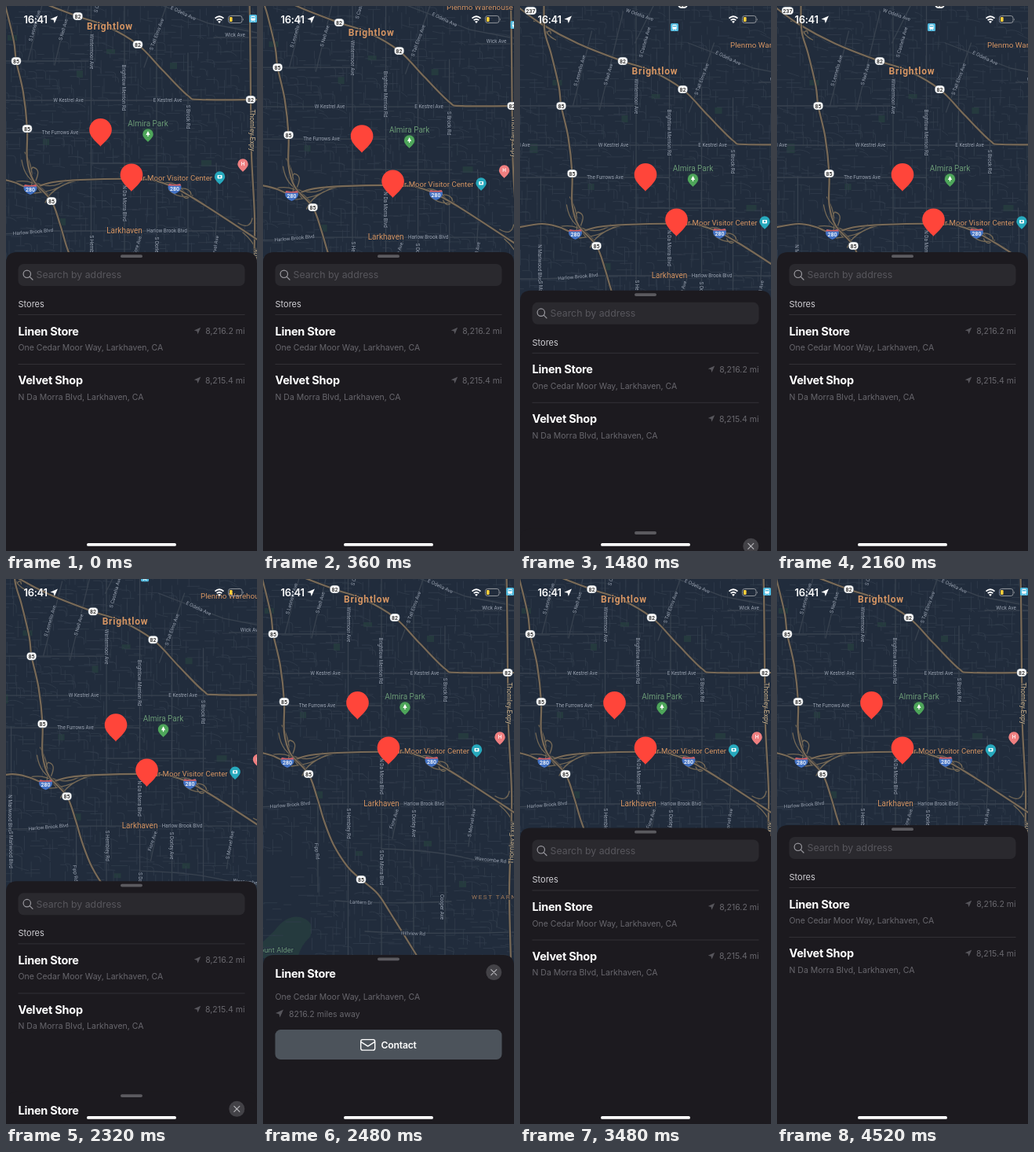
Animation of 320x693 px, one loop 4.56 s. Source, as an HTML page:

```html
<!DOCTYPE html>
<html lang="en">
<head>
<meta charset="utf-8">
<title>Store finder</title>
<style>
html, body { margin: 0; width: 100%; height: 100%; overflow: hidden; background: #1c1a1f; }
svg { display: block; width: 320px; height: 693px; font-family: Inter, sans-serif; }
#map { font-family: Roboto, sans-serif; text-anchor: middle; }
#map path { fill: none; stroke-linecap: round; stroke-linejoin: round; }
#map .label { paint-order: stroke; stroke: #212c3c; stroke-width: 1.6px; }
#map .solid { stroke: none; }
.sheet { fill: #1c1a1f; }
.title { font-size: 14.5px; font-weight: 700; fill: #fff; letter-spacing: -.25px; }
.note { font-size: 10.5px; fill: #68676d; }
.end { text-anchor: end; }
.rule { stroke: #38373c; stroke-width: .8; }
</style>
</head>
<body>
<svg viewBox="0 0 320 693">
  <defs>
    <path id="arrow" d="M5-5L-5-.6L-.6.6L.6 5Z"/>
    <path id="drop" class="solid" d="M0 0C-1.5-3.5-14.3-11-14.3-21.3A14.3 14.3 0 0 1 14.3-21.3C14.3-11 1.5-3.5 0 0Z"/>
  </defs>
  <rect width="320" height="693" fill="#212c3c"/>
  <g id="map"></g>

  <g id="status" fill="#fff">
    <text x="22.5" y="22" font-size="13" font-weight="600" letter-spacing="-.3">16:41</text>
    <use href="#arrow" transform="translate(61.2 17.3) scale(.95)"/>
    <g fill="none" stroke="#fff" stroke-width="1.8">
      <path d="M266.5 15.7Q272 10.7 277.5 15.7M268.7 18.2Q272 15.2 275.3 18.2"/>
    </g>
    <path d="M270 19.7Q272 18.2 274 19.7L272 22Z"/>
    <rect x="283.5" y="12.5" width="17.5" height="9" rx="2.8" fill="none" stroke="#9a9da3" stroke-width=".9"/>
    <path d="M302 15.4Q303.6 17 302 18.8Z" fill="#9a9da3"/>
    <rect x="285" y="14" width="3.6" height="6" rx="1.2" fill="#fdcf3b"/>
  </g>

  <g id="list">
    <path class="sheet" d="M0 400V14Q0 0 14 0H306Q320 0 320 14V400Z"/>
    <rect x="146" y="3.3" width="28" height="3.8" rx="1.9" fill="#5b5a5f"/>
    <rect x="15.5" y="15" width="289" height="28" rx="7" fill="#2a292e"/>
    <g fill="none" stroke="#9a999f" stroke-width="1.2" stroke-linecap="round">
      <circle cx="26.8" cy="27.8" r="4.7"/><path d="M30.3 31.3L34 35"/>
    </g>
    <text x="38.5" y="33.4" font-size="12.35" fill="#57565c">Search by address</text>
    <text x="15.5" y="69.8" font-size="11" fill="#cfced3">Stores</text>
    <path class="rule" d="M15.5 79.5H304.5M15.5 142.5H304.5"/>
    <g id="rows"></g>
  </g>

  <g id="detail">
    <path class="sheet" d="M0 240V14Q0 0 14 0H306Q320 0 320 14V240Z"/>
    <rect x="146" y="3.3" width="28" height="3.8" rx="1.9" fill="#5b5a5f"/>
    <circle cx="294.3" cy="22" r="10" fill="#434247"/>
    <path d="M290.8 18.5l7 7m0-7l-7 7" stroke="#b3b2b7" stroke-width="1.2" stroke-linecap="round"/>
    <g id="info">
      <text id="name" class="title" x="15.5" y="29.3"></text>
      <text id="address" class="note" x="15.5" y="57"></text>
      <use href="#arrow" x="21" y="74.5" fill="#57565c"/>
      <text id="away" class="note" x="33" y="78.5"></text>
    </g>
    <rect x="15.5" y="95" width="289" height="38" rx="7" fill="#4c535b"/>
    <g fill="none" stroke="#fff" stroke-width="1.4" stroke-linejoin="round">
      <rect x="124.7" y="107.5" width="18" height="13.5" rx="2.4"/>
      <path d="M125 110.5L133.7 116L142.4 110.5"/>
    </g>
    <text x="150.5" y="118.5" font-size="12.2" font-weight="600" fill="#fff" letter-spacing="-.2">Contact</text>
  </g>
  <rect x="103" y="683" width="114" height="3.8" rx="1.9" fill="#fff"/>
</svg>
<script>
const $ = id => document.getElementById(id);
const LOOP = 4560, PAN = [39.5, 57];
const stores = [
  { name: 'Linen Store', address: 'One Cedar Moor Way, Larkhaven, CA', miles: 8216.2 },
  { name: 'Velvet Shop', address: 'N Da Morra Blvd, Larkhaven, CA', miles: 8215.4 }
];

let seed = 7;
const rnd = () => (seed = seed * 16807 % 2147483647) / 2147483647;

const line = (d, color, width) => `<path d="${d}" stroke="${color}" stroke-width="${width}"/>`;
const text = (s, x, y, size, color, turn = 0, extra = '') =>
  `<text class="label" transform="translate(${x} ${y}) rotate(${turn})" y="${size * .35}" font-size="${size}" fill="${color}" ${extra}>${s}</text>`;
const street = (s, x, y, turn, size = 6.3) => text(s, x, y, size, '#9ca5b3', turn);

// Smooth road that passes through every point
function road(...p) {
  let d = `M${p[0]}`;
  for (let i = 0; i < p.length - 1; i++) {
    const a = p[i - 1] || p[i], b = p[i], c = p[i + 1], e = p[i + 2] || c;
    const out = b.map((v, k) => v + (c[k] - a[k]) / 6);
    const into = c.map((v, k) => v - (e[k] - b[k]) / 6);
    d += `C${out} ${into} ${c}`;
  }
  return d;
}

function sideStreets() {
  let d = '';
  for (let x = -55; x < 335; x += 11)
    for (let y = -66; y < 485; y += 11) {
      const a = x + rnd() * 8, b = y + rnd() * 8, len = 7 + rnd() * 15, kind = rnd();
      if (x < 55 && y > 330 && kind > .25) continue;
      if (kind < .34) d += `M${a} ${b}h${len}`;
      else if (kind < .66) d += `M${a} ${b}v${len}`;
      else if (kind < .8) d += `M${a} ${b}h${len * .5}q4 0 4 4v${len * .4}`;
      else if (kind < .88) d += `M${a} ${b}q${len * .5} ${rnd() * 8 - 4} ${len} ${rnd() * 6}`;
    }
  return line(d, '#313d4c', .8);
}

function parks() {
  const spots = [[174, 155, 14, 12], [2, 37, 12, 7], [90, 82, 8, 9], [128, 55, 11, 6], [209, 72, 9, 8], [47, 169, 8, 8],
    [249, 196, 13, 8], [68, 270, 8, 9], [205, 333, 10, 7], [250, 384, 9, 8], [-27, 118, 10, 12], [118, 346, 9, 6]];
  return spots.map(([x, y, w, h]) => `<rect x="${x}" y="${y}" width="${w}" height="${h}" fill="#253a3e"/>`).join('') +
    '<path class="solid" style="fill:#253a3e" d="M-45 365L-20 372L-8 392L-20 415L-45 420ZM14 448Q30 426 48 430Q68 436 60 455Q48 466 44 482H-5V466Z"/>';
}

const shield = (n, x, y) => {
  const w = n > 99 ? 15 : 12.5;
  return `<rect x="${x - w / 2}" y="${y - 5}" width="${w}" height="10" rx="4.2" fill="#fff" stroke="#33404f" stroke-width=".5"/>` +
    `<text x="${x}" y="${y + 2.5}" font-size="7" font-weight="500" fill="#222">${n}</text>`;
};
const interstate = (n, x, y) => `<g transform="translate(${x} ${y})">
  <path class="solid" style="fill:#4372c4" d="M-7-6Q0-4 7-6Q12 2 0 7Q-12 2-7-6Z"/>
  <path class="solid" style="fill:#d65c59" d="M-7-6Q0-4 7-6L8.4-3.5H-8.4Z"/>
  <text y="3.2" font-size="7" font-weight="500" fill="#fff">${n}</text></g>`;
const marker = (x, y, color, glyph, scale = .47) =>
  `<g transform="translate(${x} ${y})"><use href="#drop" transform="translate(0 10) scale(${scale})" fill="${color}"/>${glyph}</g>`;
const train = (x, y) => `<g transform="translate(${x} ${y})"><rect x="-5" y="-5" width="10" height="10" rx="1.5" fill="#4eb9de"/>
  <rect x="-2.7" y="-3.2" width="5.4" height="5.6" rx="1.2" fill="#fff"/><path d="M-1.6-1.2H1.6" stroke="#4eb9de" stroke-width="1.5"/>
  <path d="M-2 3.8L-1 2.5M2 3.8L1 2.5" stroke="#fff" stroke-width=".8"/></g>`;

function buildMap() {
  const freeway = road([-9, -60], [-8, -25], [0, 3], [10, 45], [13, 70], [22, 110], [27, 156], [27, 195], [35, 222],
    [58, 248], [69, 278], [78, 308], [90, 338], [108, 366], [125, 382], [146, 400], [162, 424], [198, 482]);
  const cross = road([-45, 225], [-12, 220], [10, 224], [31, 231], [60, 224], [95, 221], [165, 220], [200, 225], [240, 245], [325, 300]);
  const avenue = road([-45, -58], [-12, -34], [35, -9], [91, 13], [127, 25], [168, 49], [200, 82], [232, 114], [248, 119], [325, 119]);
  const expressway = road([309, -60], [311, 20], [312, 119], [313, 190], [317, 270], [316, 330], [314, 400], [316, 485]);
  const ramps = 'M20 196Q24 222 44 227T76 221M24 186Q37 208 32 232M10 224Q30 219 46 232Q62 246 63 262M38 222Q45 207 34 205Q27 213 44 236' +
    'M36 238Q60 237 84 222M55 241Q70 225 95 221M50 250Q55 236 72 228M202 225Q215 223 224 233T246 249M208 234Q220 246 238 241' +
    'M222 232Q234 231 236 239Q230 250 224 239M296 276Q311 285 314 270M302 288Q314 298 319 310' +
    'M-14-42Q-8-20 6-14M-22-38Q-4-36 0-22M-8-20Q-2-30 8-22M148 218Q153 224 161 218';
  const main = 'M108.5-60V478M151-60V482M192 40V482M232 60V482M70 286V398M-13 160V380M268 200Q272 270 262 340' +
    'M-45 120H250M-45 161H151M-45 290Q30 290 60 286H325M151 343Q220 345 260 355T325 357M92 409Q150 414 240 410' +
    'M130 448Q190 452 325 449M28 70L52-25M62 75L92-50M107-10L132-60M176 78L208-10M165 330L174 286M175-10L258 22L325 35M265 40H325M-45 70H105M110 200H235';

  $('map').innerHTML = parks() + sideStreets() + line(main, '#38424f', 1.3) +
    line(ramps, '#746855', 1.3) +
    [avenue, expressway, cross, freeway].map(d => line(d, '#1f2835', 3.4) + line(d, '#796a57', 2.2)).join('') +
    [
      ['S Leonello Ave', 36.5, 25, -74], ['S Nell Ave', 73, 30, -74], ['S Castelia Ave', 119.5, -11, -74],
      ['S Tall Elms Ave', 192, 36, -70], ['Wintermoor Ave', 108.8, 58, 90], ['Brightlow Merrion Rd', 150.5, 104, 90],
      ['W Odelia Ave', 113, -46, 19], ['E Odelia Ave', 226, 9, 25], ['Wick Ave', 292, 37, 0],
      ['W Kestrel Ave', 79.5, 120, 0], ['W Kestrel Ave', -46, 120, 0], ['E Kestrel Ave', 206, 120, 0], ['The Furrows Ave', 69, 161, 0],
      ['S Brock Rd', 232, 141, 90], ['N Da Morra Blvd', 151, 251, 90], ['S Da Morra Blvd', 151.3, 367, 90],
      ['Harlow Brook Blvd', 34.5, 287, -5], ['Harlow Brook Blvd', 205, 285.5, 0], ['S Hembley Rd', 109.5, 311, 90],
      ['Fipp Rd', 69, 346, 84], ['Fiore Ave', 167, 305, -72], ['S Dorley Ave', 192, 311, 90], ['S Morvel Ave', 266, 310, -80],
      ['Wexcombe Rd', 290, 357, 6], ['Lantern Dr', 125, 411, 3], ['Cooper Ave', 228, 417, 90], ['Hillview Rd', 191.5, 450.5, 2],
      ['N Marlwood Blvd', -14, 270, 90], ['S Marlwood Blvd', -13, 316, 90]
    ].map(a => street(...a)).join('') +
    text('Thornley Expy', 314.5, 158, 8.6, '#d0b58c', 90) + text('Thornley Expy', 317, 336, 8.6, '#d0b58c', -88) +
    shield(85, 13, 70) + shield(85, 27, 156) + shield(85, 58, 248) + shield(85, 125, 382) +
    shield(82, 91.5, 13) + shield(82, 168, 49) + shield(82, 312, 119) + shield(237, -26, -51) + shield(82, 168, -59) +
    interstate(280, 31, 233) + interstate(280, 215, 232) +
    text('Brightlow', 132.5, 25.5, 12, '#d59563', 0, 'font-weight="600" letter-spacing=".8"') +
    text('Larkhaven', 151, 285, 10, '#d59563') +
    text('Almira Park', 181, 149, 10, '#6b9a76') +
    text('Cedar Moor Visitor Center', 263, 219, 9.6, '#d59563', 0, 'style="text-anchor:end"') +
    text('Plenmo Warehouse', 228.5, -7, 9.8, '#d59563', 0, 'style="text-anchor:start"') +
    text('WEST TARN', 266, 404, 8, '#a17a5a', 0, 'style="text-anchor:start" letter-spacing="1.6"') +
    text('Harrow Brook', -.5, 385, 9.4, '#6b9a76', 0, 'style="text-anchor:end"') +
    text('County Park', -5, 396, 9.4, '#6b9a76', 0, 'style="text-anchor:end"') +
    text('Mount Alder', 39, 472, 9.4, '#6b9a76', 0, 'style="text-anchor:end"') +
    train(315, 16) + train(157.5, -30) +
    marker(181, 163, '#4ea65a', '<path class="solid" style="fill:#fff" d="M0-4L2.6 1H.6V3H-.6V1H-2.6Z"/>') +
    marker(272.5, 217, '#27a9bd', '<rect x="-3" y="-2" width="6" height="4.4" rx=".8" fill="#fff"/><circle r="1.3" fill="#27a9bd"/>') +
    marker(302, 201, '#ef7f80', '<text y="2.3" font-size="6.5" font-weight="500" fill="#fff">H</text>') +
    '<use href="#drop" x="120.5" y="178.7" fill="#ff453a"/><use href="#drop" x="160" y="236" fill="#ff453a"/>';
}

function buildRows() {
  $('rows').innerHTML = stores.map(({ name, address, miles }, i) => `<g transform="translate(0 ${i * 62.7})">
    <text class="title" x="15.5" y="105.5">${name}</text>
    <text class="note" x="15.5" y="125">${address}</text>
    <use href="#arrow" transform="translate(244 100) scale(.85)" fill="#57565c"/>
    <text class="note end" x="304.5" y="104">${miles.toLocaleString('en-US')} mi</text></g>`).join('');
}

const part = (t, start, span) => Math.min(1, Math.max(0, (t - start) / span));
const expoOut = k => k >= 1 ? 1 : k <= 0 ? 0 : 1 - 2 ** (-10 * k);
const smooth = k => k * k * (3 - 2 * k);
const move = (id, x, y) => $(id).setAttribute('transform', `translate(${x} ${y})`);

function draw(t) {
  const pan = smooth(part(t, 290, 300)) - smooth(part(t, 2170, 300));
  const open = expoOut(part(t, 432, 300)) - expoOut(part(t, 1407, 250)) +
    expoOut(part(t, 2312, 300)) - expoOut(part(t, 3312, 250));
  const closing = t > 1407 && t < 2160 || t > 3312;
  const { name, address, miles } = stores[t < 2000 ? 1 : 0];
  move('map', PAN[0] * pan, PAN[1] * pan);
  move('list', 0, 313 + 380 * open);
  move('detail', 0, 693 - 219.3 * open);
  $('info').style.display = closing ? 'none' : '';
  $('name').textContent = name;
  $('address').textContent = address;
  $('away').textContent = miles + ' miles away';
}

buildMap();
buildRows();
const begin = performance.now();
(function tick() {
  draw((performance.now() - begin) % LOOP);
  requestAnimationFrame(tick);
})();
</script>
</body>
</html>
```
